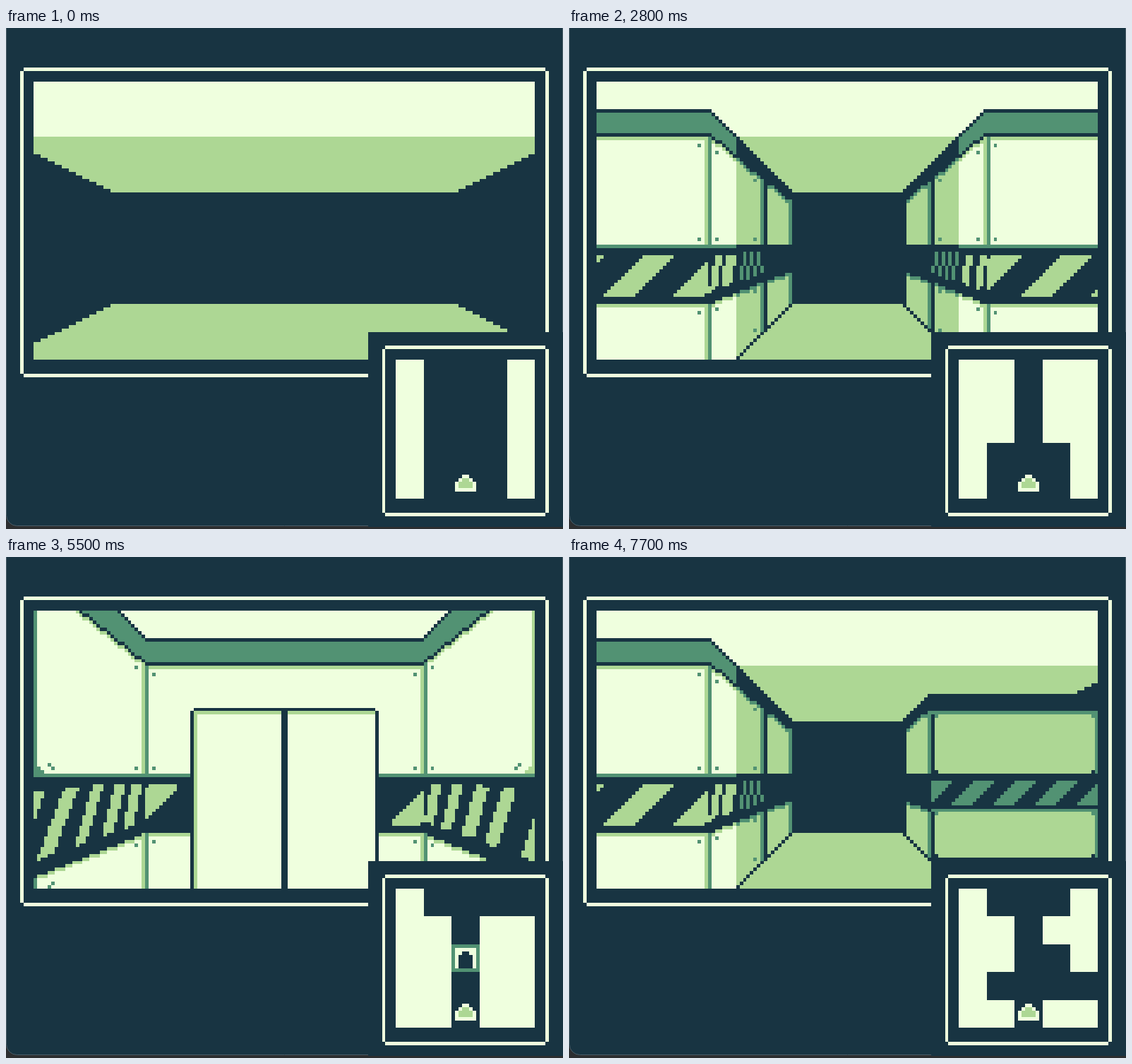
Animation, 789 px wide and 710 px high, one loop 8 s. Source, as an HTML page with a canvas:

```html
<!DOCTYPE html>
<html lang="en">
<head>
<meta charset="utf-8">
<title>Corridor</title>
<style>
  html, body { margin: 0; width: 100%; height: 100%; overflow: hidden; background: #2c2e30; }
  canvas { display: block; }
</style>
</head>
<body>
<canvas id="stage" width="789" height="710"></canvas>
<script>
const g = document.getElementById('stage').getContext('2d');
const PAL = ['#183442', '#529273', '#add794', '#efffde'];
const DARK = 0, TEAL = 1, GREEN = 2, LIGHT = 3;
const PX = 4.931, W = 144, H = 80;

// Dungeon rows in walking order; the player stays in column 2.
const OPEN = '#...#', HALL = '##.##';
const ROWS = [
  OPEN, OPEN, OPEN, OPEN, OPEN, HALL, HALL, HALL, HALL,
  '##D##', HALL, '#....', '##..#', HALL, OPEN
];
const STEPS = [0, 1400, 2100, 2800, 3500, 4200, 4900, 5500, 6200, 6900, 7700];
const LOOP = 8000;

// Per depth: half width, end of the dark band, stripe period / phase / width / first row / last row.
const DEPTHS = [
  { h: 72, band: 77, stripe: [36, 3, 17, 52, 72] },
  { h: 40, band: 64, stripe: [20, 1, 9, 50, 62] },
  { h: 24, band: 57, stripe: [12, 0, 6, 49, 56] },
  { h: 16, band: 53 }
];

// Side wall stripes: x at row 50, width.
const STRIPES = [
  [[-2, 6], [9, 4], [17, 3], [23, 3], [28, 3], [34, 2], [37, 3], [42, 1], [44, 1], [46, 1], [48, 1]],
  [[97, 1], [99, 1], [101, 1], [103, 1], [106, 2], [110, 2], [114, 3], [120, 3], [127, 4], [135, 4], [146.5, 5]]
];
const RIVETS = [
  [[29, 16], [29, 45], [29, 67], [4, 44], [5, 45], [5, 78], [4, 79], [1, 46], [2, 46], [1, 45]],
  [[34, 20], [34, 45], [34, 65], [45, 28], [45, 45], [45, 60], [45, 71]]
];

function rect(x, y, w, h, c) {
  const x0 = Math.round(39.4 + x * PX), y0 = Math.round(75.5 + y * PX);
  g.fillStyle = PAL[c];
  g.fillRect(x0, y0, Math.round(39.4 + (x + w) * PX) - x0, Math.round(75.5 + (y + h) * PX) - y0);
}

// Box from (x0, y0) to (x1, y1), clipped to the view.
function box(x0, y0, x1, y1, c) {
  x0 = Math.max(0, x0); y0 = Math.max(0, y0);
  x1 = Math.min(W, x1); y1 = Math.min(H, y1);
  if (x1 > x0 && y1 > y0) rect(x0, y0, x1 - x0, y1 - y0, c);
}
const dot = (x, y, c) => box(x, y, x + 1, y + 1, c);
const fade = (c, fog) => fog ? Math.max(0, c - 1) : c;

function backdrop() {
  box(0, 0, W, H, DARK);
  box(0, 0, W, 16, LIGHT);
  for (let y = 16; y < 32; y++) {
    const x = Math.max(0, 2 * (y - 20));
    box(x, y, W - x, y + 1, GREEN);
    box(x, 95 - y, W - x, 96 - y, GREEN);
  }
}

function side(d, right) {
  const a = 72 - DEPTHS[d].h, b = 72 - DEPTHS[d + 1].h;
  for (let x = a; x < b; x++) {
    const h = 72 - x, fog = x >= 40, px = right ? 143 - x : x;
    const col = (y0, y1, c) => box(px, y0, px + 1, y1, fade(c, fog));
    const cap = Math.round(48 - .8 * h), band = Math.round(48 + .4 * h), base = 119 - x;
    let face = LIGHT;
    if (x === a) face = right ? GREEN : TEAL;
    if (x === b - 1) face = right ? TEAL : GREEN;

    col(x - 24, base + 1, DARK);
    col(x - 23, cap - 1, TEAL);
    col(cap, 47, face);
    if (face === LIGHT) col(cap, cap + 1, GREEN);
    col(47, 48, TEAL);
    col(band, base, face);
    if (face === LIGHT) col(band, band + 1, GREEN);

    if (d > 1) continue;
    const top = h > 66 ? 52 : h > 57 ? 51 : fog ? 49 : 50;
    const end = Math.round(46.3 + .355 * h);
    for (let y = top; y < end; y++) {
      const hit = STRIPES[+right].some(([s, w]) => {
        const k = Math.min(.38 - .05 * right, Math.max(.17, ((s - 72) / 100) ** 2));
        const x0 = Math.round(s - k * (y - 50));
        return px >= x0 && px < x0 + w;
      });
      if (hit) col(y, y + 1, GREEN);
    }
  }
  (RIVETS[d] || []).forEach(([x, y]) =>
    dot(right ? 143 - x : x, y, right && x < 3 ? GREEN : TEAL));
}

function front(d, s, door) {
  const { h, band, stripe } = DEPTHS[d];
  const fog = d > 1, e = s + 2 * h, cap = Math.round(48 - .8 * h), base = 48 + h;
  const part = (x0, y0, x1, y1, c) => box(x0, y0, x1, y1, fade(c, fog));

  part(s, 48 - h, e, base, DARK);
  part(s, 49 - h, e, cap - 1, TEAL);
  for (const [y0, y1] of [[cap, 47], [band, base - 1]]) {
    part(s, y0, e, y1, LIGHT);
    part(s, y0, s + 1, y1, TEAL);
    part(e - 1, y0, e, y1, GREEN);
    part(d === 2 ? s : s + 1, y0, e, y0 + 1, GREEN);
    if (d === 2) {
      for (const x of [s + 1, e - 2]) {
        part(x, y0 + 1, x + 1, y0 + 2, GREEN);
        part(x, y1 - 1, x + 1, y1, DARK);
      }
    }
    if (d === 1) {
      const y = y0 < 47 ? y0 + 2 : y0 + 2;
      dot(s + 2, y, TEAL);
      dot(e - 3, y, TEAL);
    }
  }
  part(s, 47, e, 48, TEAL);
  if (d === 1) { dot(s + 2, 45, TEAL); dot(e - 3, 45, TEAL); }

  if (stripe && !(door && fog)) {
    const [period, phase, width, y0, y1] = stripe;
    for (let y = y0; y < y1; y++) {
      for (let x = Math.max(0, s); x < Math.min(W, e); x++) {
        if (door && Math.abs(x - 71.5) < h * .777) continue;
        const u = x - s + y - y0 - phase + period;
        if (u % period < width) part(x, y, x + 1, y + 1, GREEN);
      }
    }
  }
  if (d === 0) nearCorners();
  if (door) doorway(d);
}

function nearCorners() {
  box(0, 46, W, 47, TEAL);
  for (let i = 0; i < 3; i++) {
    box(0, 43 + i, 2 + i, 44 + i, TEAL);
    box(142 - i, 43 + i, W, 44 + i, GREEN);
  }
  box(142, 46, W, 47, GREEN);
  dot(143, 47, GREEN);
  dot(140, 45, TEAL);
  for (const x of [4, 138]) {
    box(x, 42, x + 2, 44, TEAL);
    dot(x + 1, 43, GREEN);
  }
  box(0, 77, 16, 79, GREEN);
  box(0, 77, 3, 78, TEAL);
  box(0, 78, 2, 80, TEAL);
  dot(2, 79, GREEN);
  box(16, 72, 24, 80, DARK);
}

function doorway(d) {
  const { h } = DEPTHS[d];
  const l = 72 - Math.round(h * 2 / 3), r = 144 - l, fog = d > 1;
  const top = d === 0 ? 8 : 48 - h / 2, base = 48 + h;
  box(l, top + 1, r, base, DARK);
  box(l + 1, top, r - 1, top + 1, DARK);
  box(l + 1, top + 1, r - 1, base, fade(LIGHT, fog));
  if (!fog) {
    box(l + 1, top + 1, r - 1, top + 2, GREEN);
    box(l + 1, top + 1, l + 2, base, GREEN);
  }
  if (d === 0) {
    dot(l, top + 1, LIGHT);
    dot(r - 1, top + 1, LIGHT);
    dot(l + 1, top, LIGHT);
    dot(r - 2, top, LIGHT);
    dot(l + 1, top + 1, DARK);
    dot(r - 2, top + 1, DARK);
    dot(l + 2, top + 2, GREEN);
    dot(r - 2, top + 2, GREEN);
  }
  box(71, top + 1, 73, base, DARK);
}

function view(k) {
  backdrop();
  for (let d = 3; d >= 0; d--) {
    const row = ROWS[k + 1 + d], { h } = DEPTHS[d];
    const left = row[1] === '#', right = row[3] === '#';
    if (d > 0) {
      if (left) front(d, 72 - 3 * h, false);
      if (right) front(d, 72 + h, false);
    }
    if (d < 3) {
      if (left) side(d, false);
      if (right) side(d, true);
    }
    if (row[2] === 'D') front(d, 72 - h, true);
  }
}

function minimap(k) {
  rect(96, 72, 56, 56, DARK);
  for (let i = 0; i < 5; i++) {
    const y = 112 - 8 * i;
    [...ROWS[k + i]].forEach((cell, j) => {
      const x = 104 + 8 * j;
      if (cell === '#') rect(x, y, 8, 8, LIGHT);
      if (cell === 'D' && i) {
        rect(x, y, 8, 8, TEAL);
        rect(x + 1, y + 1, 6, 6, LIGHT);
        rect(x + 3, y + 2, 2, 1, DARK);
        rect(x + 2, y + 3, 4, 4, DARK);
      }
    });
  }
  // player marker
  rect(123, 113, 2, 1, LIGHT);
  rect(122, 114, 4, 1, LIGHT);
  rect(121, 115, 6, 3, LIGHT);
  rect(123, 114, 2, 1, GREEN);
  rect(122, 115, 4, 2, GREEN);
}

function frames() {
  rect(-3, -4, 150, 1, LIGHT);
  rect(-4, -3, 1, 87, LIGHT);
  rect(-3, 84, 99, 1, LIGHT);
  rect(147, -3, 1, 75, LIGHT);
  rect(101, 76, 46, 1, LIGHT);
  rect(100, 77, 1, 47, LIGHT);
  rect(147, 77, 1, 47, LIGHT);
  rect(101, 124, 46, 1, LIGHT);
}

function windowBody() {
  g.fillStyle = '#2c2e30';
  g.fillRect(0, 0, 789, 710);
  g.beginPath();
  g.roundRect(.5, -30, 788, 735.5, 15);
  g.fillStyle = PAL[DARK];
  g.fill();
  g.strokeStyle = '#4a5d68';
  g.stroke();
}

let shown = -1;
function tick() {
  const t = performance.now() % LOOP;
  const k = STEPS.filter(s => s <= t).length - 1;
  if (k !== shown) {
    shown = k;
    windowBody();
    view(k);
    minimap(k);
    frames();
  }
  requestAnimationFrame(tick);
}
tick();
</script>
</body>
</html>
```
